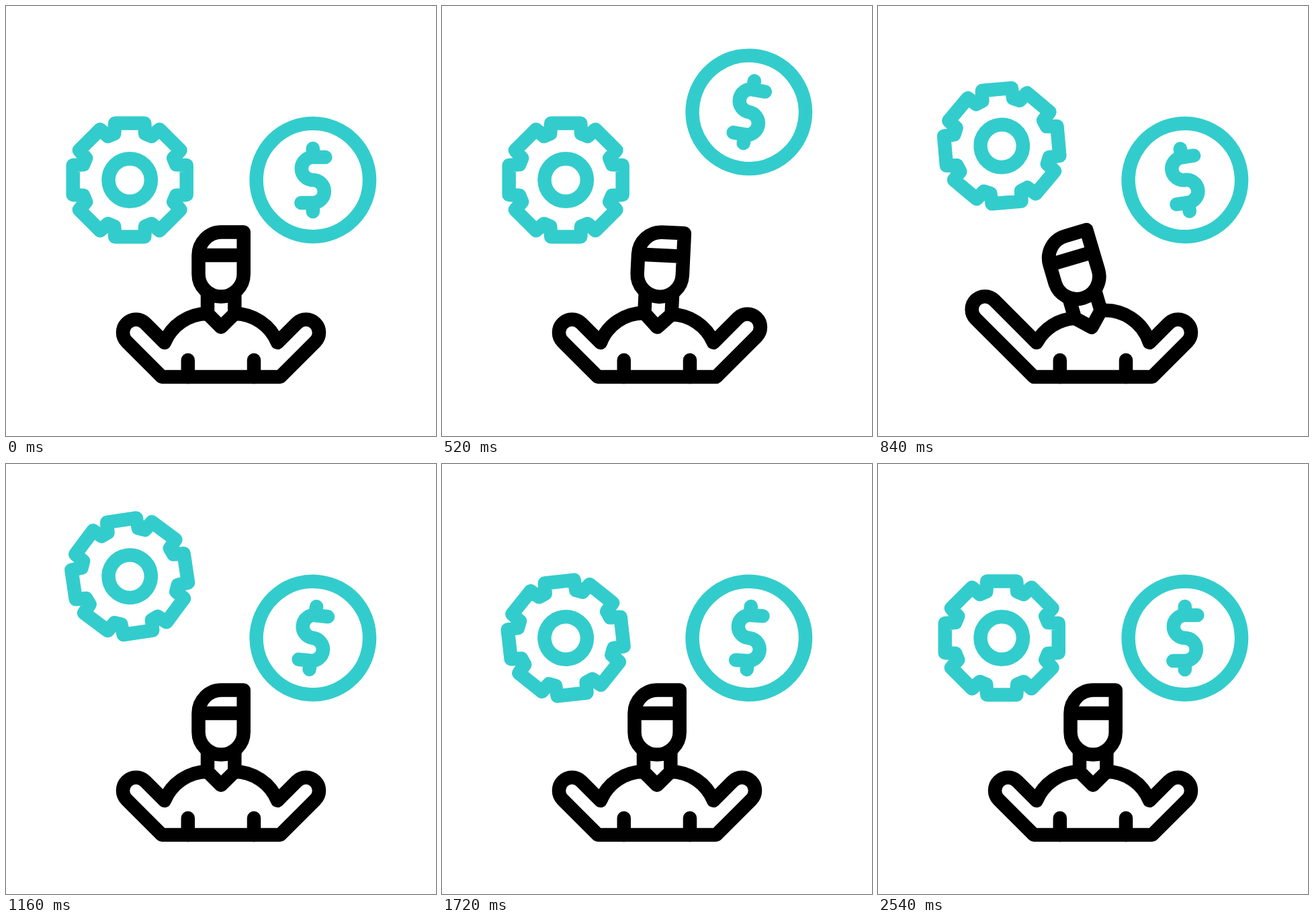
These frames come from a looping animation (640 px wide and 640 px high, 3.02 s). An HTML page:

```html
<!DOCTYPE html>
<html lang="en">
<head>
<meta charset="utf-8">
<title>Juggling gear and coin</title>
<style>
  html, body { margin: 0; width: 100%; height: 100%; overflow: hidden; background: #fff; }
  svg { display: block; width: 100%; height: 100%; }
  g { fill: none; stroke-width: 20.5; stroke-linecap: round; stroke-linejoin: round; }
  .teal { stroke: #33cccc; }
  .black { stroke: #000; }
</style>
</head>
<body>
<svg viewBox="0 0 640 640">
  <g class="teal" id="gear">
    <circle r="31.7"/>
    <path id="teeth"/>
  </g>
  <g class="teal" id="coin">
    <circle r="84.2"/>
    <path d="M18.5 -34H0A17 17 0 0 0 0 0A17 17 0 0 1 0 34H-17.5M0 -47V-34M0 34V47"/>
  </g>
  <g class="black">
    <path id="body"/>
    <path d="M270.8 527V552M369 527V552"/>
    <g id="head">
      <path d="M353.7 336.5H320.5A34 34.5 0 0 0 286.5 371V399A33.6 33.6 0 0 0 353.7 399ZM286.5 371H353.7"/>
      <path d="M300 430V458L320 478L340.3 458V430"/>
    </g>
  </g>
</svg>
<script>
const LOOP = 3020, STEP = 20, LAG = 560;
const $ = id => document.getElementById(id);

const linear = p => p;
const sine = p => (1 - Math.cos(Math.PI * p)) / 2;
const soft = p => (p + sine(p)) / 2;

// Value at time t of a table of [time, value] keys.
function track(keys, t, ease) {
  if (t <= keys[0][0]) return keys[0][1];
  for (let i = 1; i < keys.length; i++) {
    const [t0, v0] = keys[i - 1], [t1, v1] = keys[i];
    if (t < t1) return v0 + (v1 - v0) * ease((t - t0) / (t1 - t0));
  }
  return keys[keys.length - 1][1];
}

// One toss; the gear repeats the coin's toss after LAG, mirrored.
const RISE = [[20, 0], [540, 101.5], [840, 0]];
const SWAY = [[20, 0], [540, 10], [850, -8.5], [1160, 6.4], [1440, -5.5], [1720, 3.7], [1980, 0]];
const REACH = [[20, 0], [300, 37], [580, 0]];
const LEAN = [[20, 0], [300, 17.2], [580, 0]];

function turn(x, y, deg) {
  const a = deg * Math.PI / 180, c = Math.cos(a), s = Math.sin(a);
  return [x * c - y * s, x * s + y * c];
}

function teethPath() {
  const tooth = [[-23, -69], [-22, -84.5], [22, -84.5], [23, -69]];
  const pts = [];
  for (let k = 0; k < 8; k++)
    for (const [x, y] of tooth) pts.push(turn(x, y, 45 * k).map(v => v.toFixed(2)));
  return "M" + pts.join("L") + "Z";
}

function bodyPath(left, right, lean) {
  const collar = x => {
    const [dx, dy] = turn(x, -27, lean);
    return `${320 + dx} ${485 + dy}`;
  };
  return `M${collar(-20)}A69 69 0 0 0 236 501` +
    `L${207.3 - left} ${472.2 - left}A19.5 19.5 0 0 0 ${179.7 - left} ${499.8 - left}` +
    `L232 552H408` +
    `L${460.3 + right} ${499.8 - right}A19.5 19.5 0 0 0 ${432.7 + right} ${472.2 - right}` +
    `L404 501A69 69 0 0 0 ${collar(20)}`;
}

function place(id, x, t, dir) {
  const y = 259 - track(RISE, t, sine), angle = dir * track(SWAY, t, sine);
  $(id).setAttribute("transform", `translate(${x} ${y}) rotate(${angle})`);
}

function draw(t) {
  const late = t - LAG;
  const lean = track(LEAN, t, soft) - track(LEAN, late, soft);
  place("coin", 456.8, t, 1);
  place("gear", 184.2, late, -1);
  $("head").setAttribute("transform", `rotate(${lean} 320 485)`);
  $("body").setAttribute("d", bodyPath(track(REACH, late, linear), track(REACH, t, linear), lean));
}

$("teeth").setAttribute("d", teethPath());
const start = performance.now();
function tick() {
  const t = (performance.now() - start) % LOOP;
  draw(Math.floor(t / STEP) * STEP);
  requestAnimationFrame(tick);
}
draw(0);
requestAnimationFrame(tick);
</script>
</body>
</html>
```
